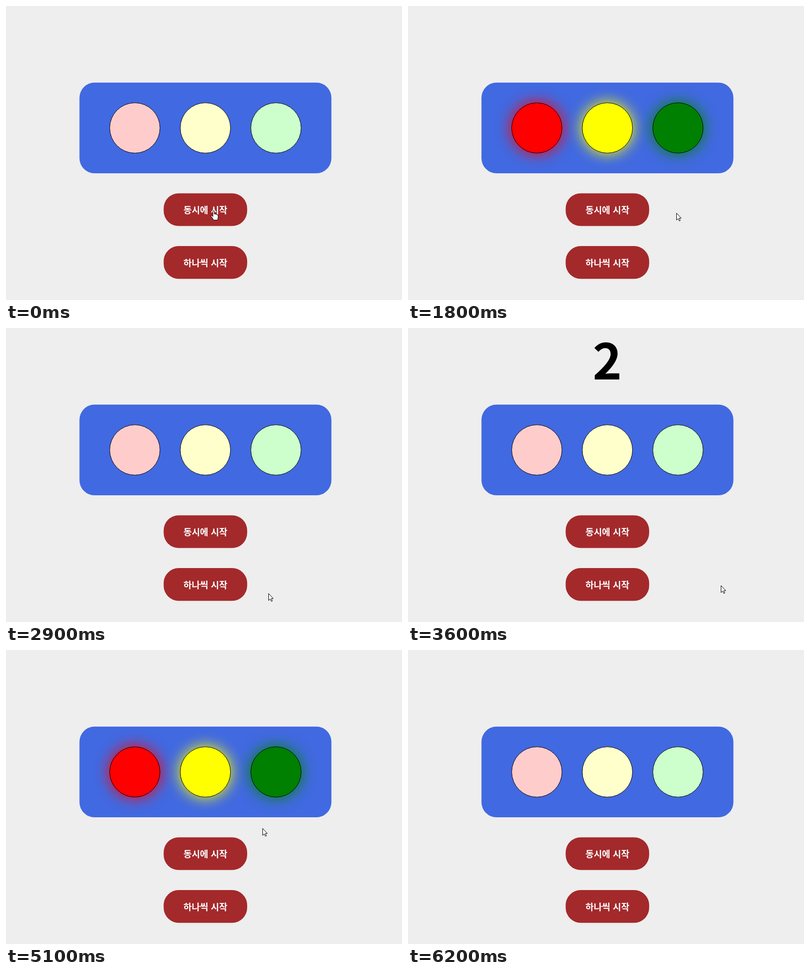
An HTML page for the animation above (6300 ms loop, 800x594 px).

```html
<!DOCTYPE html>
<html lang="ko">
<head>
<meta charset="utf-8">
<style>
  html, body { margin: 0; width: 100%; height: 100%; overflow: hidden; background: #eeeeee; }
  svg { display: block; }
  text { font-family: "Noto Sans CJK KR", "Noto Sans CJK JP", "Noto Sans", sans-serif; font-weight: 700; text-anchor: middle; }
  .label { font-size: 18.2px; fill: #fff; }
  .light { stroke: #000; stroke-width: 1; }
  .cursor { fill: #fff; stroke: #000; stroke-width: 1; stroke-linejoin: round; }
</style>
</head>
<body>
<svg width="800" height="594" viewBox="0 0 800 594">
  <text id="count" x="402.5" y="103.5" font-size="100"></text>
  <rect x="148.4" y="154.8" width="509" height="183.2" rx="30.5" fill="#4169e1"/>
  <g id="lights"></g>
  <g fill="#a4292b">
    <rect x="318.5" y="378.4" width="168.7" height="66.2" rx="30.5"/>
    <rect x="318.5" y="485" width="168.7" height="66.2" rx="30.5"/>
  </g>
  <text class="label" x="402.8" y="419.3">동시에 시작</text>
  <text class="label" x="402.8" y="525.9">하나씩 시작</text>
  <path id="arrow" class="cursor" d="M0 0V14L3.2 11 5.5 15.8 7.6 14.9 5.4 10.2H9.5Z"/>
  <path id="hand" class="cursor" d="M-1.5 10V1.5Q-1.5 0 0 0T1.5 1.5V7Q3.5 5.5 4.5 7.5Q6.5 6.5 7 8.5Q9 8 9 10V14Q8.5 17 7.5 19H0Q-2 15-5 12Q-6 9.5-4 9.5L-1.5 12Z"/>
</svg>
<script>
  const LOOP = 6300, STEP = 100, SECOND = 310, FADE = 300;
  const FIRST_GO = 1160, FIRST_OFF = 2195;
  const SECOND_GO = 3915, SECOND_OFF = 5235;

  const lights = [
    { x: 260.3, off: [255, 204, 204], on: [255, 0, 0] },
    { x: 402.8, off: [255, 255, 204], on: [255, 255, 0] },
    { x: 545.4, off: [204, 255, 204], on: [0, 128, 0] }
  ];

  // time, x, y, shape
  const moves = [
    [0, 419.5, 413.5, 'hand'],
    [200, 455, 416.5, 'hand'],
    [300, 515.5, 418.5, 'arrow'],
    [400, 542.5, 418.5, 'arrow'],
    [2600, 440.5, 517.5, 'hand'],
    [2700, 430.5, 520.5, 'hand'],
    [2900, 530.5, 536.5, 'arrow'],
    [3000, 605.5, 527.5, 'arrow'],
    [3100, 632.5, 520.5, 'arrow'],
    [4600, 620.5, 512.5, 'arrow'],
    [4700, 575.5, 448.5, 'arrow'],
    [4800, 532.5, 380.5, 'arrow'],
    [4900, 518.5, 360.5, 'arrow'],
    [5500, 625.5, 400.5, 'arrow'],
    [5600, 757.5, 465.5, 'arrow'],
    [5700, 0, 0, 'none']
  ];

  const byId = id => document.getElementById(id);
  const count = byId('count');
  const cursors = { arrow: byId('arrow'), hand: byId('hand') };

  for (const light of lights) {
    light.el = document.createElementNS('http://www.w3.org/2000/svg', 'circle');
    light.el.setAttribute('class', 'light');
    light.el.setAttribute('cx', light.x);
    light.el.setAttribute('cy', 246.4);
    light.el.setAttribute('r', 50.8);
    byId('lights').append(light.el);
  }

  // cubic-bezier(.25, .1, .25, 1)
  function ease(x) {
    if (x <= 0) return 0;
    if (x >= 1) return 1;
    const curve = (a, b, u) => 3 * a * u * (1 - u) ** 2 + 3 * b * u * u * (1 - u) + u ** 3;
    let lo = 0, hi = 1;
    for (let i = 0; i < 24; i++) {
      const mid = (lo + hi) / 2;
      if (curve(.25, .25, mid) < x) lo = mid; else hi = mid;
    }
    return curve(.1, 1, lo);
  }

  const pulse = (t, on, off) => ease((t - on) / FADE) - ease((t - off) / FADE);

  function digit(t) {
    const go = t < FIRST_OFF ? FIRST_GO : SECOND_GO;
    const left = Math.ceil((go - t) / SECOND);
    return left >= 1 && left <= 3 ? left : '';
  }

  function drawLight(light, i, t) {
    const p = pulse(t, FIRST_GO, FIRST_OFF) + pulse(t, SECOND_GO + i * SECOND, SECOND_OFF);
    const fill = light.off.map((c, k) => Math.round(c + (light.on[k] - c) * p));
    light.el.style.fill = `rgb(${fill})`;
    light.el.style.filter = p > 0
      ? `drop-shadow(0 0 ${15 * p}px rgba(${light.on}, ${p}))`
      : 'none';
  }

  function draw(t) {
    count.textContent = digit(t);
    lights.forEach((light, i) => drawLight(light, i, t));
    const [, x, y, shape] = moves.filter(m => m[0] <= t).pop();
    for (const name in cursors) {
      cursors[name].style.display = name === shape ? '' : 'none';
      cursors[name].setAttribute('transform', `translate(${x} ${y})`);
    }
  }

  const start = performance.now();
  function tick() {
    const t = (performance.now() - start) % LOOP;
    draw(Math.floor(t / STEP) * STEP);
    requestAnimationFrame(tick);
  }
  tick();
</script>
</body>
</html>
```
